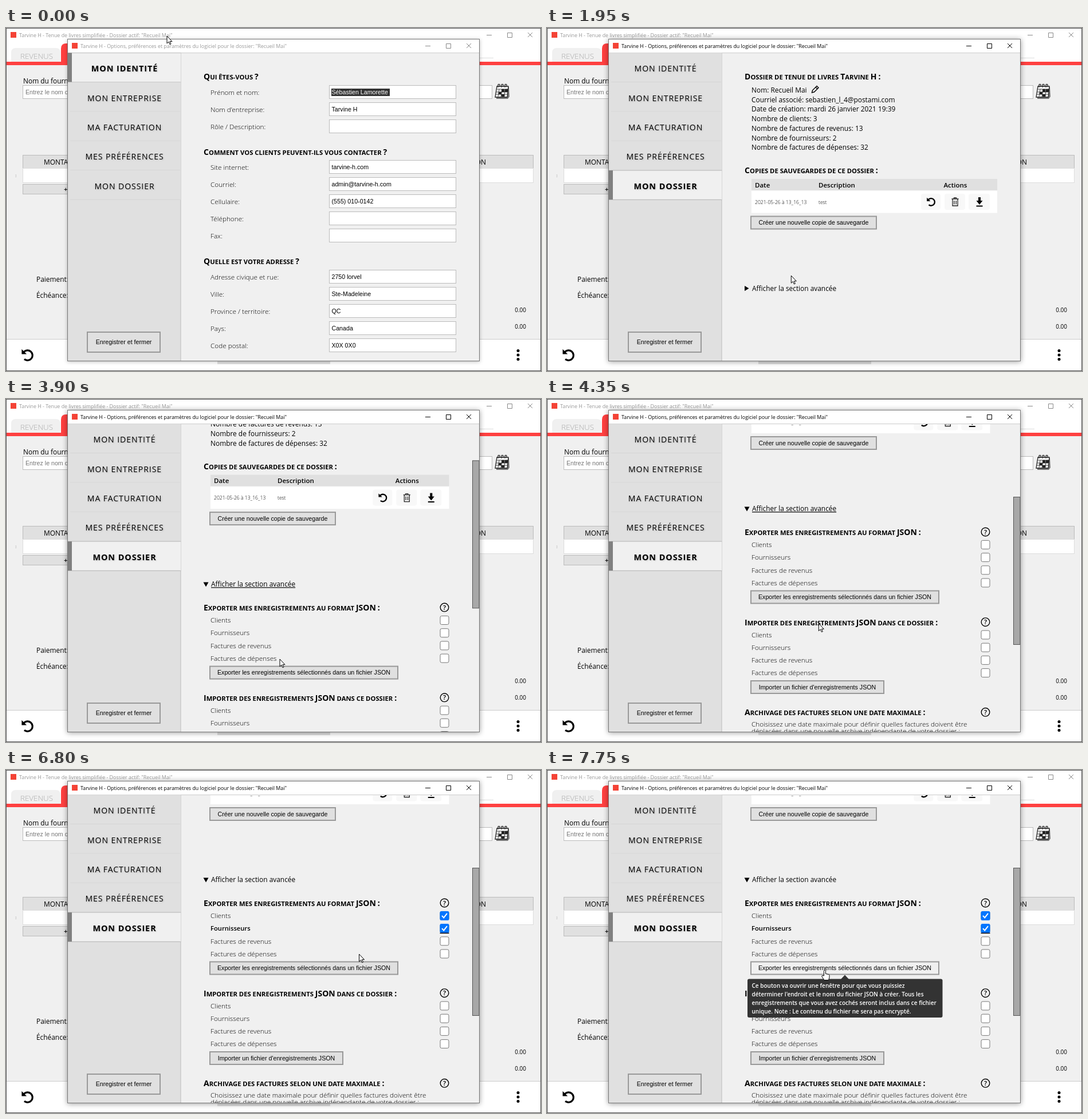
These frames come from a looping animation (934 by 600 pixels, 8 s). An HTML page:

```html
<!DOCTYPE html>
<html lang="fr">
<head>
<meta charset="utf-8">
<title>Options du dossier</title>
<style>
html, body { margin: 0; width: 100%; height: 100%; overflow: hidden; background: #f0f0f0 }
svg { display: block }
text { font: 11.9px "Open Sans", "Noto Sans", sans-serif }
.mid { text-anchor: middle }
.end { text-anchor: end }
.light { font-weight: 300; font-size: 11.75px }
.bold { font-weight: 600; font-size: 11.2px }
.field { font: 10.67px "Liberation Sans", Arial, sans-serif }
.head { font-weight: 700; font-size: 14px }
.head tspan { font-size: 11.25px }
.title { font-size: 8.9px; fill: #999 }
.small { font-size: 8.6px; font-weight: 300 }
.column { font-size: 11.5px; font-weight: 600 }
.total { font-size: 10px; text-anchor: end }
.ctl { fill: none; stroke: #888 }
.live .title { fill: #000 }
.live .ctl { stroke: #000 }
.tab rect { fill: #e0e0e0 }
.tab text { font-size: 14px; letter-spacing: .95px; filter: drop-shadow(1px 1px 1px #0003) }
.tab .bar, .tab .edge { display: none }
.tab.over rect { fill: #eaeaea }
.tab.on rect { fill: #f0f0f0 }
.tab.on .bar { display: inline; fill: #808080 }
.tab.on .edge { display: inline }
.tab.on text { font-weight: 700; font-size: 14.4px }
.tip { font-size: 10px; font-weight: 600; fill: #fff }
</style>
</head>
<body>
<svg id="stage" width="934" height="600"></svg>
<script>
const APP = 'Tarvine H', FILE = 'Recueil Mai';

const text = (x, y, s, cls = '', attr = '') => `<text x="${x}" y="${y}" class="${cls}" ${attr}>${s}</text>`;
const rect = (x, y, w, h, fill, attr = '') => `<rect x="${x}" y="${y}" width="${w}" height="${h}" fill="${fill}" ${attr}/>`;
const path = (d, attr = '') => `<path d="${d}" ${attr}/>`;
const group = (attr, ...parts) => `<g ${attr}>${parts.join('')}</g>`;
const at = (x, y, ...parts) => group(`transform="translate(${x} ${y})"`, ...parts);
const box = (x, y, w, h, fill = '#fff', stroke = '#bbb') => rect(x + .5, y + .5, w - 1, h - 1, fill, `stroke="${stroke}"`);

const heading = (y, s) =>
  text(345, y, s.replace(/[\p{Ll} -]+/gu, m => `<tspan>${m.toUpperCase()}</tspan>`), 'head');

const button = (x, y, w, h, s, id = '') =>
  rect(x + 1, y + 1, w - 2, h - 2, '#e0e0e0', `stroke="#999" stroke-width="2" id="${id}"`) +
  text(x + w / 2, y + h / 2 + 3.7, s, 'field mid');

const controls = (x, y) =>
  path(`M${x} ${y + .5}h9M${x + 36.5} ${y - 3.5}h8v8h-8zM${x + 72} ${y - 4}l8 8m0-8l-8 8`, 'class="ctl"');

const undo = (x, y, k = 1) => group(`transform="translate(${x} ${y}) scale(${k})"`,
  path('M-4.5-3.5A6 6 0 1 1-3.8 5', 'fill="none" stroke="#000" stroke-width="2.2"'),
  path('M-7-7V-1H-1z'));

const help = y => at(765.5, y,
  '<circle r="7.3" fill="none" stroke="#000" stroke-width="1.4"/>', text(0, 4, '?', 'mid bold'));

const labels = ['Clients', 'Fournisseurs', 'Factures de revenus', 'Factures de dépenses'];
const checks = (y, name) => labels.map((s, i) => {
  const c = y + i * 22.2;
  return text(357, c + 4.2, s, 'light', `id="${name}Label${i}"`) +
    at(765.5, c,
      rect(-7.5, -7.5, 15, 15, '#fff', 'rx="2.5" stroke="#767676"'),
      group(`id="${name}Tick${i}" display="none"`,
        rect(-8, -8, 16, 16, '#0075ff', 'rx="2.5"'),
        path('M-4.5 0l3.2 3.5L4.5-4', 'fill="none" stroke="#fff" stroke-width="2"')),
      path('M-8 8.3H8', `id="${name}Line${i}" stroke="#000" stroke-width="1.4" display="none"`));
}).join('');

const calendar = at(866, 111,
  path('M-10-8H12L13 9 10 13H-10z', 'fill="#777"'),
  path('M-9-9H11L9 10H-12z', 'fill="#fff" stroke="#222" stroke-width="1.3"'),
  path('M-10-4H10M-10 1H10M-11 5H9M-5-4L-7 9M0-4L-2 9M5-4L4 9', 'stroke="#444"'),
  path('M-6 1h5v4h-5zM5-4h5v5H5zM-1-4h5v5H-1zM-1 5h5v4h-5z', 'fill="#222"'),
  path('M-7-7v-5a2 2 0 0 1 3 0v4M-1-7v-5a2 2 0 0 1 3 0v4M5-7v-5a2 2 0 0 1 3 0v4', 'fill="none" stroke="#222" stroke-width="1.2"'));

const mainWindow = [
  rect(0, 0, 934, 600, '#f0f0f0'),
  rect(0, 0, 934, 60, '#fff'),
  rect(8, 7, 10, 10, '#f44336'),
  text(23, 15.5, `${APP} - Tenue de livres simplifiée - Dossier actif: "${FILE}"`, 'title'),
  controls(839, 12),
  path('M9 60V43q0-8 8-8H87q8 0 8 8V60z', 'fill="#f0f0f0"'),
  text(25, 54, 'REVENUS', 'light', 'style="font-size:13.4px" fill="#aaa"'),
  path('M96 60V36q0-9 9-9H160V60z', 'fill="#ff4040"'),
  rect(827, 52, 24, 1, '#ddd'),
  rect(0, 59, 934, 6, '#ff4040'),
  text(30, 96.5, 'Nom du fournisseur'),
  box(29, 100, 820, 24),
  text(34, 115.5, 'Entrez le nom du fournisseur', 'field', 'fill="#757575"'),
  calendar,
  box(29, 222, 892, 24, '#e0e0e0'),
  box(29, 245, 892, 26, '#fff', '#ddd'),
  box(29, 273, 160, 18, '#e0e0e0'),
  text(66, 239, 'MONTANT'), text(838, 239, 'DESCRIPTION', 'end'),
  text(101, 286, '+', 'bold'), text(15, 261, '↕', '', 'fill="#aaa" style="font-size:8px"'),
  text(53, 444, 'Paiement:'), text(53, 472, 'Échéance:'),
  text(908, 497, '0.00', 'total'), text(908, 526, '0.00', 'total'),
  rect(0, 544, 934, 56, '#fff'), rect(0, 544, 934, 1, '#ccc'),
  rect(369, 580, 197, 8, '#e0e0e0'),
  undo(37.5, 572, 1.45),
  ...[564.5, 572, 579.5].map(y => `<circle cx="894" cy="${y}" r="2.5"/>`),
  rect(.5, .5, 933, 599, 'none', 'stroke="#555"'),
].join('');

const tabNames = ['MON IDENTITÉ', 'MON ENTREPRISE', 'MA FACTURATION', 'MES PRÉFÉRENCES', 'MON DOSSIER'];
const tabs = tabNames.map((s, i) => {
  const y = 43.5 + i * 51.4;
  return group('class="tab"',
    rect(108, y, 197, 51.4, ''),
    path(`M112 ${y + 51}H304`, 'stroke="#d4d4d4"'),
    path(`M108 ${y}H305.5M108 ${y + 51.4}H305.5`, 'class="edge" stroke="#bbb"'),
    path(`M107 ${y}h8v51h-8z`, 'class="bar"'),
    text(207, y + 32.6, s, 'mid'));
}).join('');

const fields = (y, rows) => rows.map(([label, value], i) => {
  const c = y + i * 30;
  return text(357, c + 4.5, label, 'light') + box(564, c - 12, 222, 24) + text(568.5, c + 4, value, 'field');
}).join('');

const identity = group('id="identity"',
  heading(90, 'Qui êtes-vous ?'),
  fields(112, [['Prénom et nom:', ''], ["Nom d'entreprise:", APP], ['Rôle / Description:', '']]),
  rect(568, 106, 102, 13, '#333'),
  text(568.5, 116, 'Sébastien Lamorette', 'field', 'fill="#fff"'),
  heading(221.5, 'Comment vos clients peuvent-ils vous contacter ?'),
  fields(243, [['Site internet:', 'tarvine-h.com'], ['Courriel:', 'admin@tarvine-h.com'],
    ['Cellulaire:', '(555) 010-0142'], ['Téléphone:', ''], ['Fax:', '']]),
  heading(413, 'Quelle est votre adresse ?'),
  fields(435, [['Adresse civique et rue:', '2750 lorvel'], ['Ville:', 'Ste-Madeleine'],
    ['Province / territoire:', 'QC'], ['Pays:', 'Canada'], ['Code postal:', 'X0X 0X0']]));

const info = [`Nom: ${FILE}`, 'Courriel associé: sebastien_l_4@postami.com',
  'Date de création: mardi 26 janvier 2021 19:39', 'Nombre de clients: 3',
  'Nombre de factures de revenus: 13', 'Nombre de fournisseurs: 2', 'Nombre de factures de dépenses: 32'];

const actions = group('id="actions"',
  text(713, 278.5, 'Actions', 'column mid'),
  ...[[653, 34], [694, 36], [736, 37]].map(([x, w]) => rect(x, 290, w, 28, '#f8f8f8', 'rx="4"')),
  undo(670.5, 304, 1.05),
  at(712.5, 304, path('M-6-5H6M-2-5V-7H2V-5M-4.5-5V7H4.5V-5M-1.7-2V4.5M1.7-2V4.5', 'fill="none" stroke="#222" stroke-width="1.3"')),
  at(755, 304, path('M-2-8H2V-2H5.5L0 5-5.5-2H-2zM-5.5 6.5H5.5V8.5H-5.5z')));

const advanced = group('id="advanced"',
  heading(501.3, 'Exporter mes enregistrements au format JSON :'), help(496),
  checks(518.4, 'out'),
  button(355, 598, 330, 24, 'Exporter les enregistrements sélectionnés dans un fichier JSON', 'exportBtn'),
  heading(659, 'Importer des enregistrements JSON dans ce dossier :'), help(653.7),
  checks(676, 'in'),
  button(355, 755.5, 234, 24, "Importer un fichier d'enregistrements JSON"),
  heading(816.5, 'Archivage des factures selon une date maximale :'), help(811.3),
  text(357, 836.8, 'Choisissez une date maximale pour définir quelles factures doivent être', 'light'),
  text(357, 848.6, 'déplacées dans une nouvelle archive indépendante de votre dossier :', 'light'));

const folder = group('id="folder"',
  heading(90, `Dossier de tenue de livres ${APP} :`),
  ...info.map((s, i) => text(357, 113 + i * 16.7, s)),
  at(468, 107.5, path('M-5.5 5.5l1-4L3-6l3 3-7.5 7.5zM1-4l3 3', 'fill="none" stroke="#000" stroke-width="1.4"')),
  heading(254.3, 'Copies de sauvegardes de ce dossier :'),
  rect(357, 264, 429, 20, '#e0e0e0', 'class="row"'),
  rect(357, 284.5, 429, 39, '#fff', 'class="row"'),
  text(363, 278.5, 'Date', 'column'), text(474, 278.5, 'Description', 'column'),
  text(363, 307.5, '2021-05-26 à 13_16_13', 'small'), text(474, 307.5, 'test', 'small'),
  actions,
  button(355, 328.5, 221, 24, 'Créer une nouvelle copie de sauvegarde'),
  path('', 'id="arrow"'),
  text(358, 459.7, 'Afficher la section avancée', '', 'id="link"'),
  advanced);

const tip = group('id="tip"',
  path('M513 366l7-7.5 7 7.5z', 'fill="#333"'),
  rect(350, 365.5, 340.5, 67.5, '#333', 'rx="3"'),
  ...['Ce bouton va ouvrir une fenêtre pour que vous puissiez',
    "déterminer l'endroit et le nom du fichier JSON à créer. Tous les",
    'enregistrements que vous avez cochés seront inclus dans ce fichier',
    'unique. Note : Le contenu du fichier ne sera pas encrypté.'].map((s, i) => text(357.5, 381 + i * 15, s, 'tip')));

const dialog = group('id="dialog"',
  rect(107, 19, 720, 564, '#f0f0f0', 'id="frame"'),
  rect(107, 19, 720, 25, '#fff'),
  rect(115, 26, 10, 10, '#f44336'),
  text(130, 34.5, `${APP} - Options, préférences et paramètres du logiciel pour le dossier: "${FILE}"`, 'title'),
  controls(732, 31),
  rect(108, 43.5, 197, 539, '#e0e0e0'),
  path('M305 44V583', 'stroke="#bbb"'),
  path('M107 43.5H827', 'stroke="#ccc"'),
  tabs,
  button(141, 531, 129, 37, 'Enregistrer et fermer'),
  group('clip-path="url(#view)"', identity, group('id="page"', folder)),
  rect(814.5, 44.5, 11.5, 258, '#a8a8a8', 'stroke="#555" id="thumb"'),
  rect(107.5, 19.5, 719, 563, 'none', 'stroke="#777"'));

stage.innerHTML = `<clipPath id="view">${rect(306, 44, 508, 539, '#000')}</clipPath>` +
  mainWindow + dialog + tip +
  path('', 'id="pointer" fill="#fff" stroke="#000" stroke-linejoin="round"');

const $ = id => document.getElementById(id);
const tabEls = [...document.querySelectorAll('.tab')];
const ARROW = 'M0 0V13L3 10.2 5 14.8 7 14 5 9.6H9z';
const HAND = 'M-1.5 10V1.5a1.5 1.5 0 0 1 3 0V6.5l5 1q1.6.5 1.5 2V13l-1.5 4.5H-1L-5 11.5q-.6-2 1-2z';

// pointer track: time, x, y
const track = [
  [0, 281, 14], [120, 281, 14], [420, 304, 120], [900, 222, 285], [1570, 222, 285],
  [1950, 426, 433], [2400, 480, 459], [2620, 480, 459], [2650, 480, 458], [3420, 480, 458],
  [3450, 479, 457.5], [3650, 479, 457.5], [3850, 478, 455], [4120, 478, 455], [4350, 474, 393],
  [4950, 753, 248], [5100, 766, 262], [5250, 766, 262], [5600, 784, 277], [5720, 784, 277],
  [6100, 766, 279], [6230, 766, 279], [6800, 617, 322], [7050, 392, 350], [7200, 371, 350],
  [7330, 371, 350], [7550, 485, 350], [8000, 485, 350]];

const clamp = v => Math.max(0, Math.min(1, v));
const ease = v => (v = clamp(v), v * v * (3 - 2 * v));
const show = (el, on) => el.setAttribute('display', on ? 'inline' : 'none');

// slope at a track point, zero where the pointer rests
function slope(i, k) {
  const a = track[i - 1], b = track[i], c = track[i + 1];
  if (!a || !c) return 0;
  const rests = (p, q) => p[1] === q[1] && p[2] === q[2];
  return rests(a, b) || rests(b, c) ? 0 : (c[k] - a[k]) / (c[0] - a[0]);
}

function pointerAt(t) {
  const i = track.findIndex(p => p[0] > t) - 1, a = track[i], b = track[i + 1];
  const d = b[0] - a[0], u = (t - a[0]) / d;
  return [1, 2].map(k => a[k] + (b[k] - a[k]) * ease(u) +
    d * u * (1 - u) * ((1 - u) * slope(i, k) - u * slope(i + 1, k)));
}

function draw(t) {
  const [x, y] = pointerAt(t);
  const live = t >= 1050, opened = t >= 1100, expanded = t >= 3050;
  const scroll = 131.4 * ease((t - 3610) / 250) + 132.1 * ease((t - 4110) / 220);

  $('dialog').classList.toggle('live', live);
  $('frame').style.filter = `drop-shadow(0 1px ${live ? '5px #0006' : '3px #0004'})`;
  tabEls.forEach((el, i) => {
    const top = 43.5 + i * 51.4;
    el.classList.toggle('on', i === (opened ? 4 : 0));
    el.classList.toggle('over', x < 305 && y >= top && y < top + 51.4);
  });

  show($('identity'), !opened);
  show($('folder'), opened);
  show($('advanced'), expanded);
  show($('thumb'), expanded);
  $('page').setAttribute('transform', `translate(0 ${-scroll})`);
  $('thumb').setAttribute('y', 44.5 + scroll * .482);
  $('actions').setAttribute('transform', `translate(${expanded ? -12.7 : 0} 0)`);
  document.querySelectorAll('.row').forEach(r => r.setAttribute('width', expanded ? 416.5 : 429));
  $('arrow').setAttribute('d', expanded ? 'M344.5 452h9l-4.5 8z' : 'M345 451l7.5 4.5-7.5 4.5z');
  $('link').setAttribute('text-decoration', t >= 2300 && t < 5250 ? 'underline' : 'none');

  [[5250, 6250], [6250, 8000]].forEach(([from, to], i) => {
    const focus = t >= from && t < to;
    show($('outTick' + i), t >= from);
    show($('outLine' + i), focus);
    $('outLabel' + i).setAttribute('class', focus ? 'bold' : 'light');
  });

  const onButton = t > 6800 && x < 685 && y >= 335;
  $('exportBtn').setAttribute('fill', onButton ? '#f0f0f0' : '#e0e0e0');
  $('tip').setAttribute('opacity', clamp((t - 7400) / 300));
  const hand = t >= 2300 && t < 3750 || onButton;
  $('pointer').setAttribute('d', hand ? HAND : ARROW);
  $('pointer').setAttribute('transform', `translate(${x} ${y})`);
}

(function loop() {
  draw(performance.now() % 8000);
  requestAnimationFrame(loop);
})();
</script>
</body>
</html>
```
